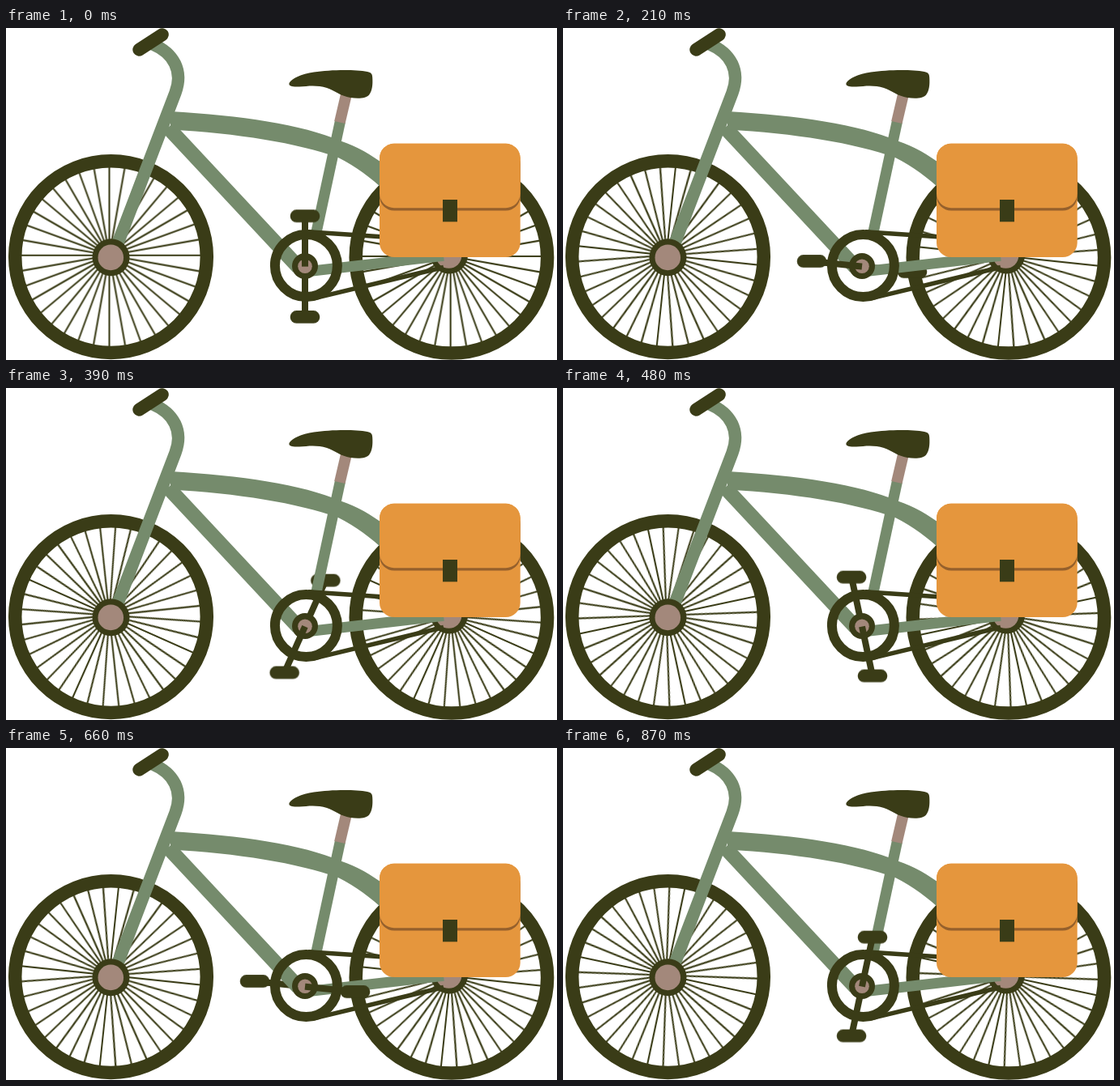
An HTML page that plays this animation: 680x410 px, repeating every 900 ms.

```html
<!DOCTYPE html>
<html lang="en">
<head>
<meta charset="utf-8">
<title>Bicycle</title>
<style>
  :root { --dark: #3a3c17; --green: #758b6c; --rose: #a3887b; --bag: #e5963d; --seam: #95602c; }
  html, body { margin: 0; width: 100%; height: 100%; overflow: hidden; background: #fff; }
  svg { display: block; width: 680px; height: 410px; }
  .dark { fill: var(--dark); }
  .rose { fill: var(--rose); }
  .bag { fill: var(--bag); }
  .line { fill: none; stroke: var(--dark); }
  .tube { fill: none; stroke: var(--green); }
  .spin, .level { animation: turn .9s steps(30) -1ms infinite; }
  .level { animation-direction: normal; animation-name: unturn; }
  @keyframes turn { to { transform: rotate(-360deg); } }
  @keyframes unturn { to { transform: rotate(360deg); } }
</style>
</head>
<body>
<svg viewBox="0 0 680 410">
  <defs>
    <g id="pedal"><rect class="dark" x="-18.3" y="-7.9" width="36.6" height="15.7" rx="7.8"/></g>
  </defs>

  <!-- wheels -->
  <g transform="translate(127.5 280.7)"><path class="line spokes spin" stroke-width="2.1"/></g>
  <circle class="line" cx="129.5" cy="282.6" r="118.3" stroke-width="16.5"/>
  <g transform="translate(548.6 281.9)"><path class="line spokes spin" stroke-width="2.1"/></g>
  <circle class="line" cx="549.9" cy="283.4" r="118.2" stroke-width="16.5"/>
  <circle class="dark" cx="547" cy="280.5" r="23"/>
  <circle class="rose" cx="546.5" cy="281" r="15.8"/>

  <!-- far crank -->
  <g transform="translate(369 294.6)">
    <g class="spin">
      <path class="line" d="M0 0V62" stroke-width="8"/>
      <g transform="translate(0 62.3)"><use class="level" href="#pedal"/></g>
    </g>
  </g>

  <!-- frame -->
  <path class="tube" d="M376 300.3L540 281.4" stroke-width="13"/>
  <path class="tube" d="M412.5 115L383 252" stroke-width="13.2"/>
  <path d="M413.8 78L427.3 81L418.6 118L405.2 115Z" class="rose"/>
  <path class="tube" d="M200 123L361 295.5" stroke-width="18"/>
  <path fill="var(--green)" d="M203 103C290 108 365 119 413 139.5C434 147 449 155 470 171V203C449 184 432 171 410 160C360 142 285 130 203 125.5Z"/>
  <path class="tube" d="M136 271L209 80C219 53 207 31 181 20" stroke-width="15.4"/>
  <path class="line" d="M164.3 26.7L192.8 8.2" stroke-width="16" stroke-linecap="round"/>
  <path class="dark" d="M349.5 68C353 62 364 57 380 54.5C400 51.5 430 51 446 54C451 55 452 57 452.2 61C452.8 70 452 77 448.5 82C445 87 435 87.5 425 86C413 84 407 78 396 74C384 70 373 71.500 362 72.500C354 73 348.500 72 349.500 68Z"/>
  <circle class="dark" cx="129.5" cy="283.2" r="23"/>
  <circle class="rose" cx="129.3" cy="283.4" r="15.8"/>

  <!-- drivetrain -->
  <path class="line" d="M373 251.8L470 258.2M380 333.9L540 295.5" stroke-width="5.6"/>
  <circle class="line" cx="370.4" cy="293.5" r="38.5" stroke-width="12"/>
  <circle class="dark" cx="369" cy="294" r="16"/>
  <circle class="rose" cx="369" cy="294.3" r="8.8"/>

  <!-- near crank -->
  <g transform="translate(369 294.6)">
    <g class="spin">
      <path class="line" d="M0 0V-62" stroke-width="8"/>
      <g transform="translate(0 -62.3)"><use class="level" href="#pedal"/></g>
    </g>
  </g>

  <!-- bag -->
  <rect class="bag" x="461" y="142.800" width="173.700" height="140.200" rx="18"/>
  <rect fill="var(--seam)" x="461" y="150" width="173.700" height="75.500" rx="18"/>
  <rect class="bag" x="461" y="142.800" width="173.700" height="79.400" rx="18"/>
  <rect class="dark" x="539" y="212" width="18" height="27.300"/>
</svg>
<script>
  const count = 36, reach = 116;
  let d = "";
  for (let i = 0; i < count; i++) {
    const a = i * 2 * Math.PI / count;
    d += `M0 0L${(reach * Math.cos(a)).toFixed(2)} ${(reach * Math.sin(a)).toFixed(2)}`;
  }
  document.querySelectorAll(".spokes").forEach(p => p.setAttribute("d", d));
</script>
</body>
</html>
```
